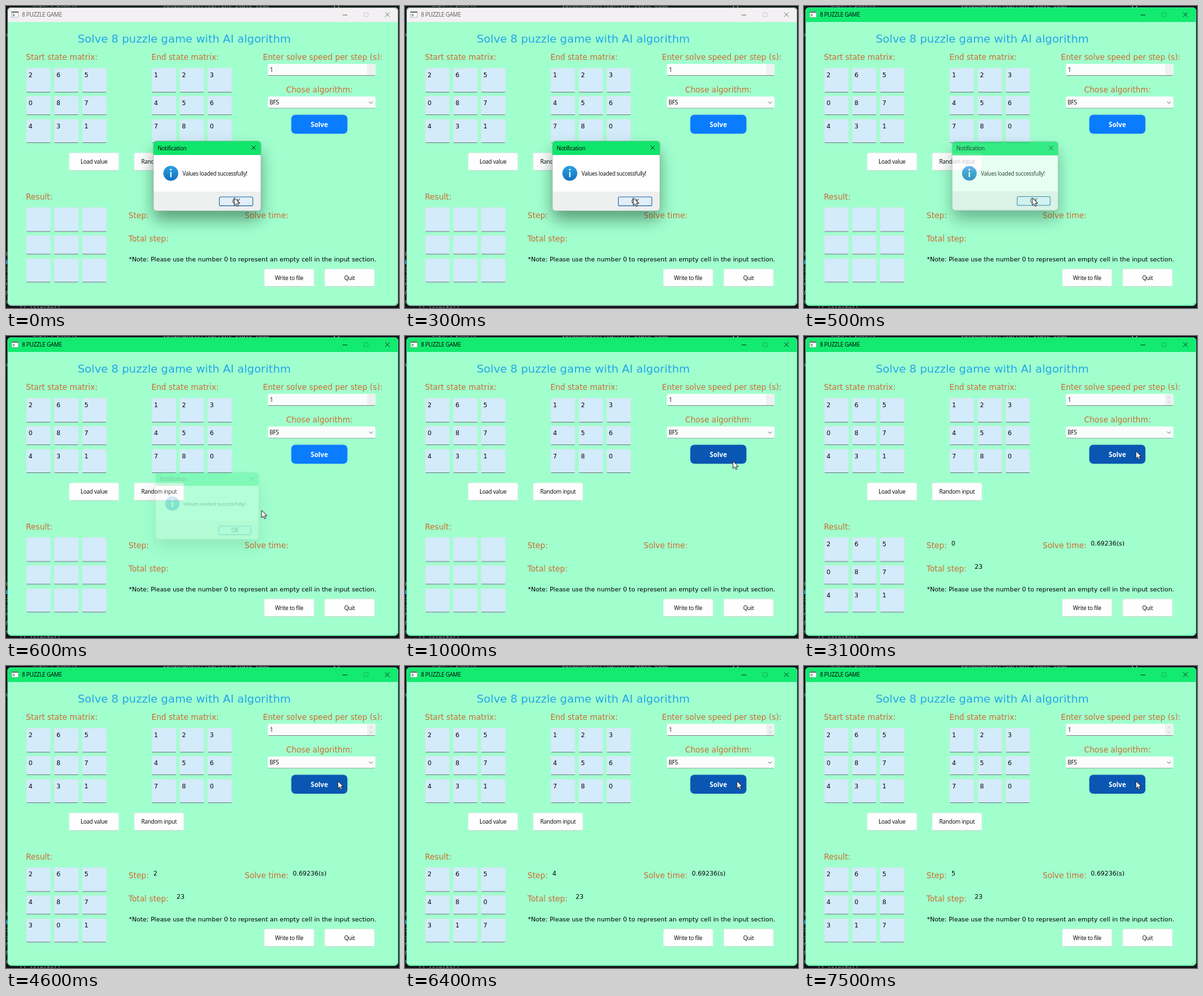
Recreate the animation shown at these times as an HTML page. Size 592 px wide and 454 px high, loop 8 s.

```html
<!DOCTYPE html>
<html lang="en">
<head>
<meta charset="utf-8">
<title>8 puzzle solver</title>
<style>
  html, body { margin: 0; width: 100%; height: 100%; overflow: hidden; background: #11141a; }
  svg { display: block; width: 592px; height: 454px; }
  text { white-space: pre; font: 8.5px "Open Sans", "Noto Sans", sans-serif; letter-spacing: -.24px; fill: #000; }
  .wide { font: 9.35px "DejaVu Sans", sans-serif; letter-spacing: 0; }
  .label { font: 11.72px "DejaVu Sans", sans-serif; letter-spacing: 0; fill: #cb6d2e; }
  .heading { font: 16.68px "DejaVu Sans", sans-serif; letter-spacing: 0; fill: #22a7e8; }
  .mid { text-anchor: middle; }
  .message { font-size: 8.3px; }
  .solve { font-size: 9.9px; font-weight: 700; letter-spacing: 0; fill: #fff; }
  .back { font: 9px "DejaVu Sans Mono", monospace; fill: #8f969e; }
  .line { fill: none; stroke: #173d28; stroke-width: 1; }
</style>
</head>
<body>
<svg id="stage" viewBox="0 0 592 454" xmlns="http://www.w3.org/2000/svg"></svg>
<script>
const rect = (x, y, w, h, fill, extra = "") =>
  `<rect x="${x}" y="${y}" width="${w}" height="${h}" fill="${fill}" ${extra}/>`;
const text = (x, y, content, cls = "", extra = "") =>
  `<text x="${x}" y="${y}" class="${cls}" ${extra}>${content}</text>`;
const cross = (x, y, r) =>
  `<path class="line" d="M${x - r} ${y - r}l${2 * r} ${2 * r}m0 ${-2 * r}l${-2 * r} ${2 * r}"/>`;

function grid(x, y, digits, id = "") {
  const tops = [0, 42, 77], heights = [36, 28, 35];
  return [...digits].map((digit, i) => {
    const cx = x + (i % 3) * 42, row = Math.floor(i / 3), cy = y + tops[row];
    return rect(cx, cy, 36.5, heights[row], "#d3ebfa", 'rx="1.5" stroke="#d6e6e4" stroke-width=".6"') +
      rect(cx + .5, cy + heights[row] - .5, 35.5, 1, "#75858c") +
      text(cx + 3.2, cy + 13.2, digit, "wide", id && `id="${id}${i}"`);
  }).join("");
}

const button = (x, y, caption) =>
  rect(x, y, 75, 26.5, "#fdfefd", 'rx="2.5" stroke="#d5ebdf" stroke-width=".8"') +
  rect(x + 2, y + 26, 71, .8, "#b9d2c4") +
  text(x + 37.5, y + 16.6, caption, "mid");

const backdrop =
  rect(0, 0, 592, 454, "#11141a") +
  text(236, 2.4, "valuehandler.current_state_code", "back") +
  text(40, 1, "import puzzle", "back") +
  text(20, 457, "() isinite()", "back") +
  `<circle cx="498" cy="-1" r="4" fill="none" stroke="#b8bcc2"/>` +
  [["n", 46], ["D", 376], ["O", 388], ["c", 399], ["c", 411], ["7", 423], ["V", 435], ["e", 447]]
    .map(([c, y]) => text(-3, y, c, "back")).join("") +
  rect(0, 383, 2, 5, "#2489d8");

const titleBar =
  `<path id="bar" d="M2 24V8q0-6 6-6H585q6 0 6 6V24Z"/>` +
  rect(2.5, 2.5, 588, 447.7, "none", 'rx="5.5" id="frame"') +
  rect(8.5, 8.5, 10, 8.5, "#fbfcfb", 'stroke="#8fa198" stroke-width=".6"') +
  rect(8.5, 8.5, 10, 1.6, "#53655c") + rect(10, 11.8, 3, 3.5, "#9aaaa2") +
  `<g id="caption">${text(24, 16.4, "8 PUZZLE GAME")}
    <path class="line" d="M507 13.5h7"/>
    <rect class="line" x="539.5" y="10" width="6" height="6" rx="1" opacity=".28"/>
    ${cross(574.5, 13, 3.3)}</g>`;

const form =
  text(108, 55, "Solve 8 puzzle game with AI algorithm", "heading") +
  text(30, 81, "Start state matrix:", "label") +
  text(219, 81, "End state matrix:", "label") +
  text(387, 81, "Enter solve speed per step (s):", "label") +
  text(422, 130, "Chose algorithm:", "label") +
  grid(30.7, 93.5, "265087431") + grid(219.7, 93.5, "123456780") +
  rect(394.5, 87, 162, 17.5, "#fbfdfc", 'rx="2"') + rect(395.5, 104, 160, 1, "#87928c") +
  rect(544, 87.5, 12, 16.5, "#eef1ef") +
  `<path id="spin" fill="#cfd3d1" d="M547.5 93.5l2.5-3 2.5 3ZM547.5 98.5l2.5 3 2.5-3Z"/>` +
  text(397.5, 99.3, "1") +
  rect(394.5, 136, 162, 17.5, "#fbfdfc", 'rx="2"') + rect(395.5, 153, 160, 1, "#a3b8ad") +
  text(397, 148.2, "BFS") +
  `<path class="line" d="M547 143.7l2.8 2.8 2.8-2.8" style="stroke:#626965"/>` +
  rect(429.7, 163.4, 84.6, 28.6, "#0a7cff", 'rx="6" id="solve"') +
  text(472, 181.7, "Solve", "mid solve") +
  button(95, 220.8, "Load value") + button(193, 220.8, "Random input");

const results =
  text(30, 290.5, "Result:", "label") + grid(30.7, 303, " ".repeat(9), "cell") +
  text(184.5, 318.5, "Step:", "label") + text(222, 315.3, "", "wide", 'id="step"') +
  text(359.5, 318.5, "Solve time:", "label") + text(432, 315.3, "", "wide", 'id="time"') +
  text(184.5, 353.5, "Total step:", "label") + text(257, 350.3, "", "wide", 'id="total"') +
  text(185, 384, "*Note: Please use the number 0 to represent an empty cell in the input section.", "wide") +
  button(389, 395.3, "Write to file") + button(480, 395.3, "Quit") +
  [[588, 444], [588, 447], [585, 447]].map(([x, y]) => rect(x, y, 1, 1, "#78bd99")).join("");

const dialog = `<g id="dialog">
  ${rect(222.5, 206, 161, 104, "#123f2b", 'rx="6" filter="url(#shadow)"')}
  <g id="panel">
  ${rect(222, 203, 162, 105, "#fff", 'rx="5"')}
  <path fill="#10e56c" d="M222 224V208q0-5 5-5H379q5 0 5 5V224Z"/>
  <path fill="#eeefef" d="M222 279H384V303q0 5-5 5H227q-5 0-5-5Z"/>
  <rect x="222" y="203" width="162" height="105" rx="5" fill="none" stroke="#83ab98" stroke-width=".6"/>
  ${text(228.5, 216.6, "Notification")}${cross(373, 213, 3.2)}
  <circle cx="248.3" cy="251.5" r="11.2" fill="url(#blue)"/>
  ${rect(247.4, 249.3, 1.9, 8, "#fff")}<circle cx="248.3" cy="246" r="1.3" fill="#fff"/>
  ${text(266, 255.2, "Values loaded successfully!", "message")}
  ${rect(321.4, 287, 50.4, 13.4, "#e2effa", 'rx="2" stroke="#3579ad" stroke-width="1.1"')}
  ${text(346.6, 296.8, "OK", "mid")}
  </g>
</g>`;

const stage = document.getElementById("stage");
stage.innerHTML = `<defs>
  <filter id="shadow" x="-40%" y="-50%" width="180%" height="220%">
    <feOffset dy="11"/><feGaussianBlur stdDeviation="12"/>
    <feComponentTransfer><feFuncA type="linear" slope=".52"/></feComponentTransfer>
  </filter>
  <linearGradient id="blue" x2="0" y2="1">
    <stop stop-color="#2ba0e4"/><stop offset="1" stop-color="#126fbe"/>
  </linearGradient></defs>` +
  backdrop + rect(2, 2, 589, 448.7, "#a1ffce", 'rx="6"') + titleBar + form + results + dialog +
  `<path id="cursor" d="M0 0V11.2L2.6 8.8 4.4 12.7 6.3 11.8 4.6 8.1H8.1Z"
    fill="#fff" stroke="#15191d" stroke-width=".9" stroke-linejoin="round"/>`;

const get = id => document.getElementById(id);
const LOOP = 8000, TICK = 100;
const cursorPath = [[0, 344, 288.5], [600, 385, 262], [700, 448, 232], [800, 482, 214],
  [1000, 494, 188], [1100, 496, 184], [1200, 498, 179], [1300, 499, 175], [1400, 500, 173]];
const dialogPath = [[0, 1, 1], [500, .75, .986], [600, .22, .96], [700, 0, .95]];
const boards = [[0, " ".repeat(9)], [2500, "265087431"], [3600, "265487031"], [4600, "265487301"],
  [5400, "265487310"], [6400, "265480317"], [7500, "265408317"]];
const lastIndex = (track, t) => track.findLastIndex(key => key[0] <= t);

function draw(now) {
  const t = Math.floor((now % LOOP) / TICK) * TICK;
  const [, x, y] = cursorPath[lastIndex(cursorPath, t)];
  get("cursor").setAttribute("transform", `translate(${x} ${y})`);

  // The panel fades over its own shadow, so both dim together as one group.
  const [, opacity, scale] = dialogPath[lastIndex(dialogPath, t)];
  get("dialog").setAttribute("opacity", opacity);
  get("dialog").setAttribute("transform", `translate(303 255.5) scale(${scale}) translate(-303 -255.5)`);

  const active = t >= 500;
  get("bar").setAttribute("fill", active ? "#12ea70" : "#f3eff2");
  get("frame").setAttribute("stroke", active ? "#3fdc8c" : "#7d9a8b");
  get("caption").setAttribute("opacity", active ? 1 : .62);
  get("solve").setAttribute("fill", t >= 1000 ? "#0957b3" : "#0a7cff");
  get("spin").setAttribute("opacity", t >= 2900 ? .7 : 0);

  const solved = t >= 2400, move = lastIndex(boards, t);
  get("time").textContent = solved ? "0.69236(s)" : "";
  get("total").textContent = solved ? "23" : "";
  get("step").textContent = move ? move - 1 : "";
  [...boards[move][1]].forEach((digit, i) => { get("cell" + i).textContent = digit; });
}

function loop(now) {
  draw(now);
  requestAnimationFrame(loop);
}
draw(0);
requestAnimationFrame(loop);
</script>
</body>
</html>
```
